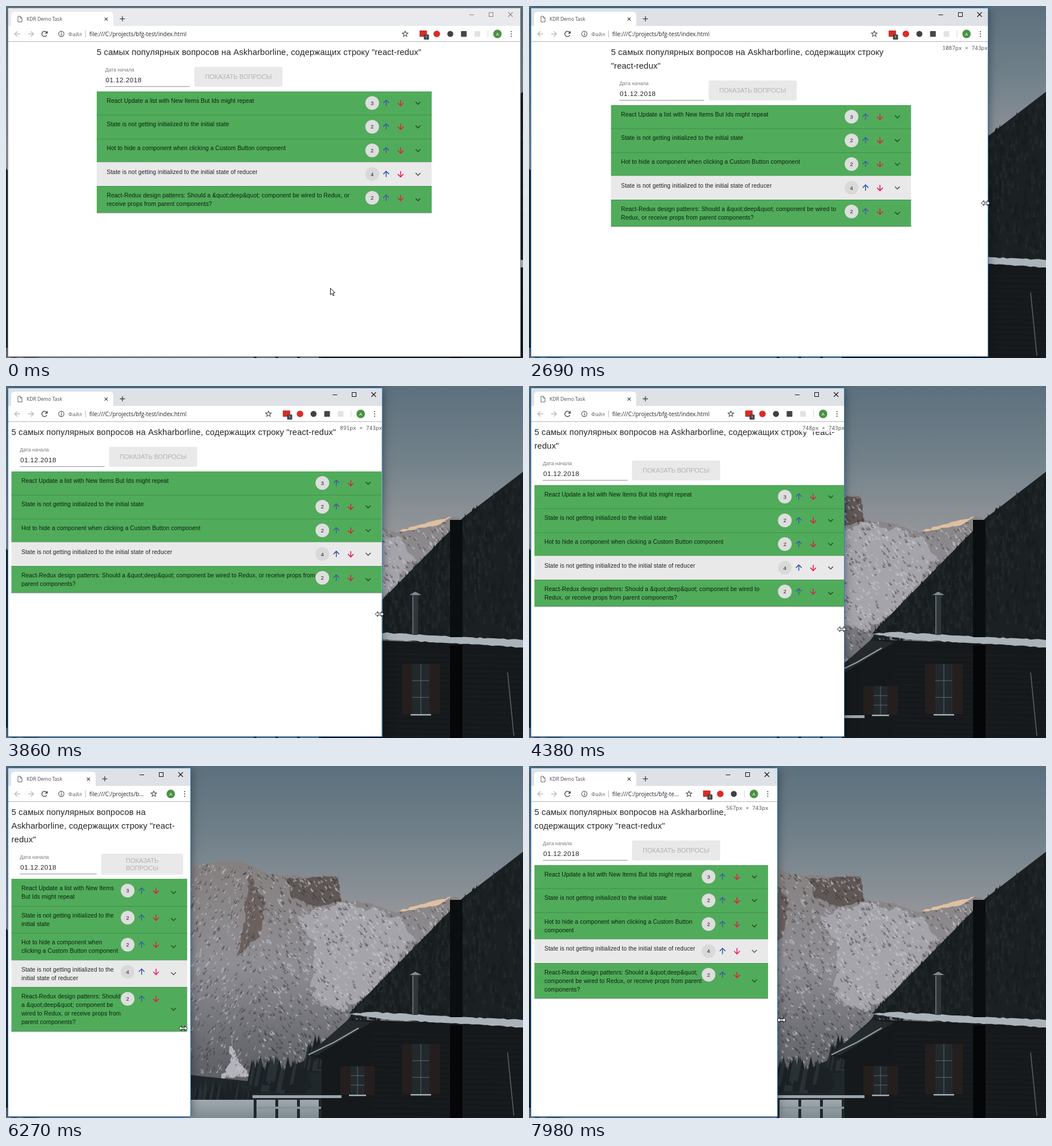
An HTML page with a canvas for the animation above (8 s loop, 906 by 618 pixels).

```html
<!DOCTYPE html>
<html lang="ru">
<head>
<meta charset="utf-8">
<title>Responsive list</title>
<style>
html, body { margin: 0; width: 100%; height: 100%; overflow: hidden; background: #5d727f; }
canvas { display: block; width: 906px; height: 618px; }
</style>
</head>
<body>
<canvas id="stage" width="906" height="618"></canvas>
<script>
const W = 906, H = 618, LOOP = 8000, LEFT = 4, TOP = 4, BOTTOM = 615;
const MIN_EDGE = 323, GRAB = 2018, STEP = 131.25;
const stage = document.getElementById('stage').getContext('2d');
let c = stage;

const SANS = '"Liberation Sans", Arial, sans-serif';
const UI = '"Open Sans", "Noto Sans", sans-serif';
const MONO = '"Noto Sans Mono", "Liberation Mono", monospace';

const TITLE = '5 самых популярных вопросов на Askharborline, содержащих строку "react-redux"';
const URL_TEXT = 'file:///C:/projects/bfg-test/index.html';
const ROWS = [
  ['React Update a list with New Items But Ids might repeat', 3],
  ['State is not getting initialized to the initial state', 2],
  ['Hot to hide a component when clicking a Custom Button component', 2],
  ['State is not getting initialized to the initial state of reducer', 4],
  ['React-Redux design pattenrs: Should a &quot;deep&quot; component be wired to Redux, or receive props from parent components?', 2]
];

// The drag: [refresh count since the grab, x, y]
const DRAG = [[0, 901, 312], [1, 897, 316], [5, 800, 346], [8, 748, 371.5], [13, 680, 396],
  [14, 654.5, 400.5], [18, 548, 427], [21, 431.5, 447], [22, 404.5, 450.5], [24, 333, 456],
  [26, 310.5, 460.5], [32, 310.5, 460.5], [39, 273, 469], [42, 335, 458], [44, 395, 450],
  [45, 442.5, 446]];

function drag(n, col) {
  let i = 0;
  while (i < DRAG.length - 2 && DRAG[i + 1][0] <= n) i++;
  const a = DRAG[i], b = DRAG[i + 1];
  const k = Math.min(1, Math.max(0, (n - a[0]) / (b[0] - a[0])));
  return a[col] + (b[col] - a[col]) * k;
}
// The window follows the pointer with some delay and stops at its smallest width
const edgeAt = n => Math.max(MIN_EDGE, drag(n, 1));

function rect(x, y, w, h, color, r = 0) {
  c.fillStyle = color;
  c.beginPath();
  c.roundRect(x, y, w, h, r);
  c.fill();
}
function disc(x, y, r, color) {
  c.fillStyle = color;
  c.beginPath();
  c.arc(x, y, r, 0, 7);
  c.fill();
}
function trace(p, close) {
  c.beginPath();
  for (let i = 0; i < p.length; i += 2) c.lineTo(p[i], p[i + 1]);
  if (close) c.closePath();
}
function poly(color, ...p) {
  trace(p, true);
  c.fillStyle = color;
  c.fill();
}
function line(color, width, ...p) {
  trace(p);
  c.strokeStyle = color;
  c.lineWidth = width;
  c.stroke();
}
function gradient(y0, y1, ...colors) {
  const g = c.createLinearGradient(0, y0, 0, y1);
  colors.forEach((s, i) => g.addColorStop(i / (colors.length - 1), s));
  return g;
}
function setFont(size, family, spacing = 0) {
  c.font = `${size}px ${family}`;
  c.letterSpacing = spacing + 'px';
}
function text(s, x, y, color, align = 'left') {
  c.fillStyle = color;
  c.textAlign = align;
  c.fillText(s, x, y);
}
function wrap(s, width) {
  const lines = [''];
  for (const part of s.split(/(?<=[ -])/)) {
    const last = lines.length - 1;
    if (lines[last] && c.measureText((lines[last] + part).trimEnd()).width > width) lines.push(part);
    else lines[last] += part;
  }
  return lines.map(l => l.trimEnd());
}
function clipped(width, s) {
  if (c.measureText(s).width <= width) return s;
  while (s && c.measureText(s + '…').width > width) s = s.slice(0, -1);
  return s + '…';
}

let seed = 11;
const rnd = () => (seed = seed * 16807 % 2147483647) / 2147483647;

// Splits the sides of a polygon and shakes the new corners
function rough(amp, ...p) {
  const out = [];
  for (let i = 0; i < p.length; i += 2) {
    const [x, y, u, v] = [p[i], p[i + 1], p[(i + 2) % p.length], p[(i + 3) % p.length]];
    const parts = Math.ceil(Math.hypot(u - x, v - y) / 7);
    for (let k = 0; k < parts; k++) {
      const off = k && amp;
      out.push(x + (u - x) * k / parts + (rnd() - 0.5) * off, y + (v - y) * k / parts + (rnd() - 0.5) * off);
    }
  }
  return out;
}
function tree(x, y, h, color) {
  poly(color, x, y, x + h / 5, y + h, x - h / 5, y + h);
}

function paintMountain() {
  c.save();
  poly(gradient(165, 530, '#85807f', '#8f8e94', '#606268'), ...rough(4, 0, 290, 200, 262, 300, 192,
    335, 174, 385, 166, 412, 167, 460, 190, 535, 194, 582, 192, 588, 236, 640, 241, 684, 258,
    780, 230, 810, 235, 700, 618, 0, 618));
  c.clip();
  poly('#6b625f', ...rough(8, 425, 186, 456, 240, 445, 300, 405, 335, 420, 260));
  poly('#5f5856', ...rough(5, 492, 198, 582, 192, 588, 238, 540, 246, 500, 230));
  poly('#a5a4ab', ...rough(12, 510, 262, 590, 240, 690, 265, 715, 300, 640, 410, 585, 430, 532, 405, 545, 320));
  poly('#b3b4bb', ...rough(8, 392, 470, 404, 510, 430, 545, 372, 552, 394, 520));
  // Snow and bare rock
  for (let i = 0; i < 2600; i++) {
    const x = 300 + rnd() * 480, y = 168 + rnd() * 380, s = 2 + rnd() * 6;
    const snow = y > 420 ? 0.35 : x > 520 && y > 245 ? 0.65 : 0.5;
    const dir = x < 440 ? -0.5 : 0.7;
    poly(rnd() < snow ? 'rgba(205,205,214,.5)' : 'rgba(48,44,45,.42)',
      x, y, x + s * dir + 2, y + s, x + s * dir - rnd() * 3, y + s + 1);
  }
  c.restore();
  poly('#dfc0a0', ...rough(3, 684, 256, 740, 239, 781, 229, 760, 243, 712, 253));
}

function paintForest() {
  poly('#20272b', 0, 285, 110, 430, 300, 540, 440, 555, 560, 500, 610, 430, 640, 600, 0, 600);
  for (let x = 320; x < 600; x += 3) {
    const y = (x < 430 ? 550 : x < 530 ? 505 : 470) + rnd() * 25;
    tree(x, y, 45, rnd() < 0.5 ? '#1b2125' : '#293136');
  }
  rect(60, 586, 500, 32, gradient(586, 618, '#a0a9af', '#7e8a92'));

  const ridge = x => 232 + (800 - x) * (x > 800 ? 0.77 : 1.02);
  poly('#1b2022', W, ridge(W), 800, 232, 600, 436, W, 470);
  for (let i = 0; i < 700; i++) {
    const x = 605 + rnd() * 305, y = ridge(x) - 5 + rnd() ** 1.3 * (440 - ridge(x));
    tree(x, y, 14, rnd() < 0.55 ? '#171c1e' : '#22282a');
  }
}

function paintCabin() {
  poly('#16191b', 600, 445, W, 456, W, H, 553, H, 553, 515, 530, 507);
  poly('#24292c', 600, 446, 640, 450, 545, 508, 530, 506);
  for (let y = 470; y < H; y += 9) line('#1e2123', 1, 640, y, W, y + 5);
  poly('#abb3ba', ...rough(2, 594, 435, 640, 432, W, 446, W, 459, 680, 446));
  line('#909aa1', 2.5, 530, 507, 575, 485, 618, 460);
  rect(778, 235, 22, 206, '#0b0e10');
  rect(778, 455, 22, 163, '#050607');
  rect(712, 367, 10, 70, '#30373b');
  line('#737e85', 1.5, 713, 368, 713, 436);
  poly('#7f8a92', 707, 367, 717, 361, 728, 367);
  for (const [x, y, w, h] of [[712, 488, 30, 88], [604, 527, 24, 50]]) {
    rect(x - 18, y, w + 36, h, '#241f1e');
    rect(x, y, w, h, '#22292d');
    line('#5d686f', 1, x + w / 2, y, x + w / 2, y + h);
    for (let k = 1; k < 3; k++) line('#5d686f', 1, x, y + h * k / 3, x + w, y + h * k / 3);
    rect(x - 3, y + h, w + 6, 2.5, '#a6afb5');
  }
  line('#59646a', 1.5, 879, 503, 890, 614);
  for (let x = 434; x < 560; x += 38) rect(x, 581, 5, 37, '#20272b');
  rect(432, 578, 156, 5, '#9aa5ac');
  rect(440, 598, 112, 4, '#87929a');
}

const wallpaper = document.createElement('canvas');
wallpaper.width = W;
wallpaper.height = H;
c = wallpaper.getContext('2d');
rect(0, 0, W, H, gradient(0, 270, '#5c707d', '#73828b', '#97989c'));
paintMountain();
paintForest();
paintCabin();
c = stage;

function paintTabs(right, active) {
  const ink = active ? '#111' : '#888';
  rect(LEFT, TOP, W, 32, active ? '#dee1e6' : '#e8eaed');
  const end = Math.min(188, right - 166);
  rect(9, 10, end - 9, 32, '#fff', 6);
  rect(LEFT, 35, W, 28, '#fff');
  line('#5f6368', 1, 25, 18, 21, 18, 21, 28, 28, 28, 28, 21, 25, 18, 25, 21, 28, 21);
  setFont(8.5, UI);
  text('KDR Demo Task', 36, 26, '#45494d');
  const x = end - 12.5;
  line('#3c4043', 1.2, x - 2.7, 20.3, x + 2.7, 25.7);
  line('#3c4043', 1.2, x + 2.7, 20.3, x - 2.7, 25.7);
  line('#3c4043', 1.3, end + 11.5, 22.5, end + 20.5, 22.5);
  line('#3c4043', 1.3, end + 16, 18, end + 16, 27);

  const close = right - 17;
  line(ink, 1, close - 72, 15.5, close - 64, 15.5);
  c.strokeRect(Math.round(close - 38) + 0.5, 11.5, 7, 7);
  line(ink, 1.1, close - 4, 11, close + 4, 19);
  line(ink, 1.1, close + 4, 11, close - 4, 19);
}

function paintStar(x, y) {
  const p = [];
  for (let i = 0; i <= 10; i++) {
    const r = i % 2 ? 2.3 : 5.2, a = i * Math.PI / 5 - Math.PI / 2;
    p.push(x + r * Math.cos(a), y + r * Math.sin(a));
  }
  line('#4a4e52', 1.1, ...p);
}

function paintToolbar(right) {
  const y = 49, dark = '#4a4e52', pale = '#b4b7ba';
  for (const [x, d] of [[20, -1], [43.5, 1]]) {
    line(pale, 1.3, x - 4.7, y, x + 4.7, y);
    line(pale, 1.3, x, y - 4.5, x + 4.7 * d, y, x, y + 4.5);
  }
  c.beginPath();
  c.arc(67.5, y, 4.6, 0.5, 5.5);
  c.strokeStyle = dark;
  c.lineWidth = 1.5;
  c.stroke();
  poly(dark, 73, 43.5, 73, 48.5, 68, 48.5);
  c.beginPath();
  c.arc(97, y, 4.6, 0, 7);
  c.lineWidth = 1.1;
  c.stroke();
  rect(96.4, 48.3, 1.3, 3.4, dark);
  rect(96.4, 46, 1.3, 1.3, dark);
  setFont(9.4, UI);
  text('Файл', 109, 52.5, '#5f6368');
  rect(139, 43, 1, 12, '#b9bcbf');

  const dots = Math.max(right - 15.5, 313);
  const count = Math.max(0, Math.min(5, Math.floor((dots - 343) / 24)));
  const star = count ? dots - 66 - 24 * count : dots - 54;
  setFont(10, UI);
  text(clipped(star - 16.5 - 146, URL_TEXT), 146, 52.5, '#26282b');
  paintStar(star, y);
  for (let i = 0; i < count; i++) {
    const x = dots - 59.5 - 23.7 * (count - 1 - i);
    if (i === 0) {
      rect(x - 6.5, 43, 13, 11, '#d32d27', 1);
      rect(x + 1, 50, 9, 9, '#43474b', 1.5);
      setFont(7, UI);
      text('1', x + 5.5, 57, '#fff', 'center');
    } else if (i === 1) disc(x, y, 5.8, '#dd2a2a');
    else if (i === 2) disc(x, y, 5.3, '#3f4346');
    else rect(x - 5, 44, 10, 10, i === 3 ? '#44484b' : '#e2e3e4', 1);
  }
  if (count) rect(dots - 41.5, 43, 1, 12, '#d3d5d7');
  disc(dots - 24.3, y, 7.4, '#4a9242');
  setFont(8, UI);
  text('A', dots - 24.3, 52, '#fff', 'center');
  for (const d of [-4, 0, 4]) disc(dots, y + d, 1.1, dark);
  rect(LEFT, 62, W, 1, '#b3b5b7');
}

function arrow(x, y, dir, color) {
  line(color, 1.5, x, y - 5.2 * dir, x, y + 5 * dir);
  line(color, 1.5, x - 5, y, x, y + 5 * dir, x + 5, y);
}

function paintRow([label, votes], i, l, r, y) {
  const read = i === 3;
  setFont(10.27, SANS, 0.08);
  const lines = wrap(label, r - 115.5 - (l + 17.5));
  const h = Math.max(41.6, 17.5 + 15 * lines.length);
  const top = Math.round(y);
  rect(l, top, r - l, Math.round(y + h) - top, read ? '#e9e9ea' : '#50ac5a');
  if (i) rect(l, top, r - l, 1, read ? '#d0d2d0' : '#44914c');
  lines.forEach((s, n) => text(s, l + 17.5, y + 20.2 + 15 * n, read ? '#222' : '#0e2010'));
  const mid = y + 20.8;
  disc(r - 104.3, mid, 12, read ? '#d9d9d9' : '#dedede');
  setFont(9.5, SANS);
  text(votes, r - 104.3, mid + 3.4, '#222', 'center');
  arrow(r - 79.8, mid, -1, read ? '#3450a8' : '#3c5ca4');
  arrow(r - 54.5, mid, 1, read ? '#f00d55' : '#e5174a');
  const cy = y + h / 2;
  line(read ? '#5c5c5c' : '#27502b', 1.6, r - 28.2, cy - 2, r - 24, cy + 2.2, r - 19.8, cy - 2);
  return y + h;
}

function paintPage(right) {
  const view = right - LEFT, side = view >= 704 ? view / 6 : 0;
  const l = LEFT + side + 5.5, r = right - side - 5.5;

  setFont(14.8, SANS, 0.13);
  const lines = wrap(TITLE, r - l);
  lines.forEach((s, i) => text(s, l, 86.3 + 24 * i, '#242424'));
  const dy = 24 * (lines.length - 1);

  // Form row: both parts give way when space runs out
  const lack = Math.max(0, 332.5 - (r - l)), narrow = lack > 0;
  const fx = l + 14.7, fw = 148.5 - lack * 0.56, bx = fx + fw + 7.8, bw = 154.5 - lack * 0.44;
  setFont(8.8, SANS);
  text('Дата начала', fx, 114.5 + dy, '#7b7b7b');
  setFont(11.74, SANS, 0.45);
  text('01.12.2018', fx + 0.7, 134 + dy, '#222');
  rect(fx, 141 + dy, fw, 1, '#8f8f8f');
  rect(bx, (narrow ? 106 : 106.7) + dy, bw, narrow ? 36.8 : 35, '#e9e9ea', 3);
  setFont(11, SANS);
  const words = 'ПОКАЗАТЬ ВОПРОСЫ', mid = bx + bw / 2;
  if (narrow) words.split(' ').forEach((s, i) => text(s, mid, 122 + dy + 12.6 * i, '#b2b2b3', 'center'));
  else text(words, mid, 128.4 + dy, '#b2b2b3', 'center');

  let y = 149.5 + dy + (narrow ? 0.5 : 0);
  ROWS.forEach((row, i) => { y = paintRow(row, i, l, r, y); });
  y = Math.round(y);
  rect(l, y - 1, r - l, 1, '#459550');
  rect(l, y, r - l, 1, 'rgba(0,0,0,.22)');
  rect(l + 1, y + 1, r - l - 2, 1, 'rgba(0,0,0,.08)');
}

function paintSize(edge, right) {
  const size = Math.round(1.353 * (Math.min(edge, right - 6) - LEFT) + 6);
  const s = `${size}px × 743px`, x = right - (size > 999 ? 85 : 79);
  rect(x - 4, 63, 90, 17.5, 'rgba(255,255,255,.8)');
  setFont(9.5, MONO);
  text(s, x, 76.5, '#555');
}

function paintPointer(x, y, resizing) {
  const half = [-7.5, 0, -3, -4.5, -3, -1.5, 3, -1.5, 3, -4.5];
  const p = resizing ? [...half, ...half.map(v => -v)]
    : [0.5, 0.5, 0.5, 12, 3.2, 9.5, 5.2, 13.8, 7, 13, 5.2, 8.8, 8.5, 8.5];
  trace(p.map((v, i) => v + (i % 2 ? y : x)), true);
  c.fillStyle = '#fff';
  c.fill();
  c.strokeStyle = '#111';
  c.lineWidth = 1;
  c.stroke();
}

function paint(time) {
  const n = Math.floor((time - GRAB) / STEP);
  const edge = edgeAt(n - 0.16), right = edgeAt(n - 0.38);
  const chrome = Math.max(edge - 1, (edge + right) / 2);
  const active = n >= 0, sizing = n > 0 && n < 32 || n > 41;

  c.drawImage(wallpaper, 0, 0);
  c.save();
  c.shadowColor = active ? 'rgba(0,0,0,.5)' : 'rgba(0,0,0,.35)';
  c.shadowBlur = active ? 16 : 8;
  c.shadowOffsetY = 2;
  rect(LEFT, TOP, edge - LEFT, BOTTOM - TOP, '#fff');
  c.restore();

  c.save();
  c.beginPath();
  c.rect(LEFT, TOP, edge - LEFT, BOTTOM - TOP);
  c.clip();
  paintTabs(chrome, active);
  paintToolbar(chrome);
  paintPage(right);
  if (sizing) paintSize(edge, right);
  c.restore();

  c.strokeStyle = active ? '#2b83cb' : '#8d979d';
  c.lineWidth = 1;
  c.strokeRect(LEFT - 0.5, TOP - 0.5, Math.round(edge) - LEFT + 1, BOTTOM - TOP + 1);

  if (active) paintPointer(drag(n, 1), drag(n, 2), true);
  else {
    // Glide to the window border
    const rest = Math.exp(-Math.max(0, GRAB + n * STEP + 40 - 770) / 220);
    paintPointer(900 - 332 * rest, 312 + 183 * rest, rest < 0.02);
  }
}

const start = performance.now();
function tick() {
  paint((performance.now() - start) % LOOP);
  requestAnimationFrame(tick);
}
tick();
</script>
</body>
</html>
```
